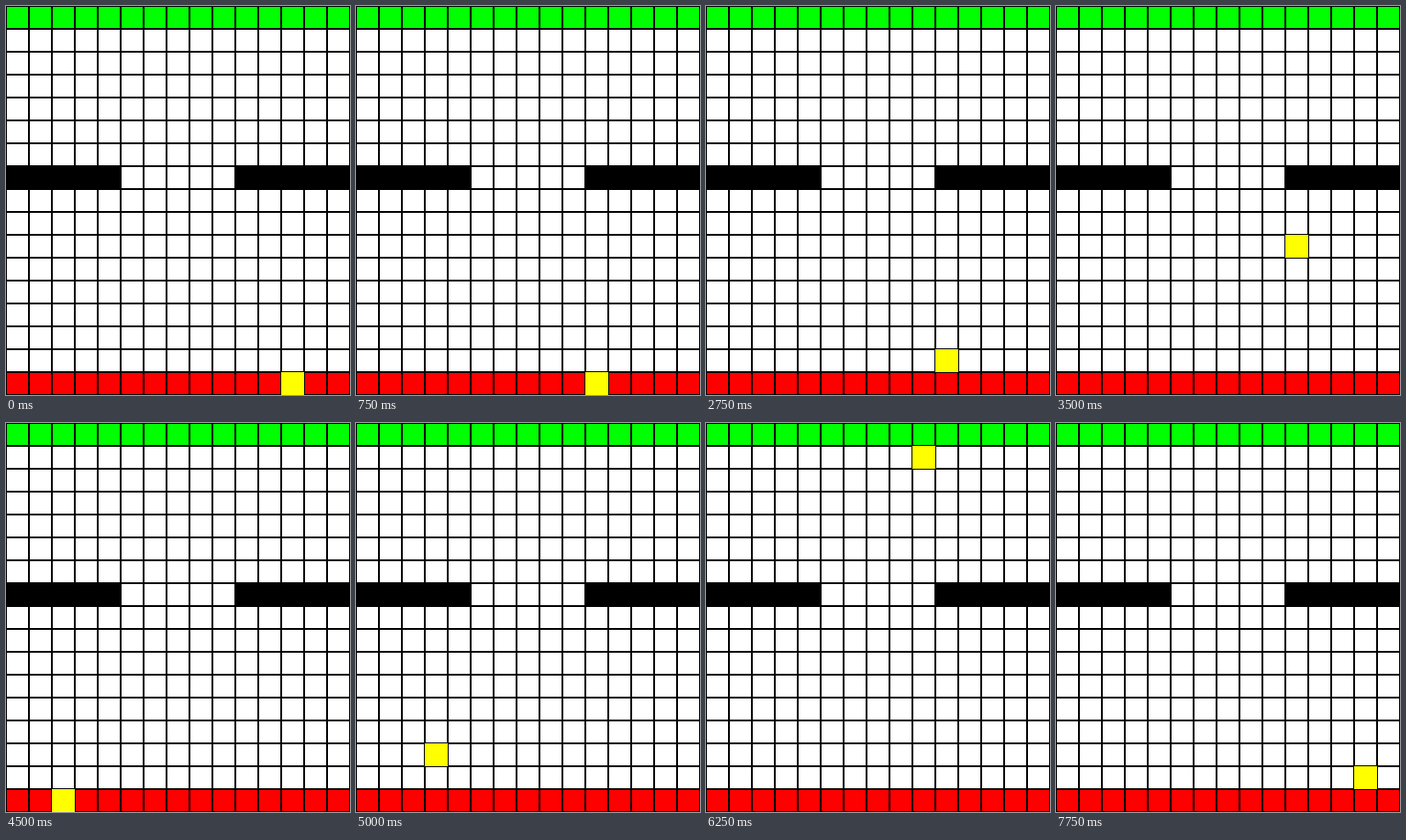
Animation of 375x425 px, one loop 8.25 s. Source, as an HTML page with a canvas:

```html
<!DOCTYPE html>
<html lang="en">
<head>
<meta charset="utf-8">
<title>Grid race</title>
<style>
  html, body { margin: 0; width: 100%; height: 100%; overflow: hidden; background: #fff; }
  canvas { display: block; width: 375px; height: 425px; }
</style>
</head>
<body>
<canvas id="stage" width="375" height="425"></canvas>
<script>
const CELL = 25, COLS = 15, ROWS = 17;
const LAST_ROW = ROWS - 1, WALL_ROW = 7, WALL_LENGTH = 5;
const STEP = 250, LOOP = 33 * STEP;
const HOME = 12;
const ctx = document.getElementById('stage').getContext('2d');

// Steering per step: compass letters accelerate, "." coasts, "x" flashes the home cell.
const runs = [
  { start: HOME, steering: '. . NE' },
  { start: 10, steering: '. . N N N SE' },
  { start: 10, steering: '. . N x N N SE' },
  { start: 1, steering: '. . E NW E N NE x NW E .' },
  { start: HOME, steering: '. . . . NE' }
];

// Change in speed along one axis
function push(word, plus, minus) {
  return word.includes(plus) - word.includes(minus);
}

function drive({ start, steering }) {
  let col = start, row = LAST_ROW, dx = 0, dy = 0;
  return steering.split(' ').map(word => {
    if (word === 'x') return [HOME, LAST_ROW];
    dx += push(word, 'E', 'W');
    dy += push(word, 'S', 'N');
    col += dx;
    row += dy;
    return [col, row];
  });
}

const path = runs.flatMap(drive);

function cellColor(col, row) {
  if (row === 0) return '#00ff00';
  if (row === LAST_ROW) return '#ff0000';
  const fromSide = Math.min(col, COLS - 1 - col);
  return row === WALL_ROW && fromSide < WALL_LENGTH ? '#000' : '#fff';
}

function fillCell(col, row, color, inset) {
  const size = CELL - 2 * inset;
  ctx.fillStyle = color;
  ctx.fillRect(col * CELL + inset, row * CELL + inset, size, size);
}

function drawTrack() {
  ctx.fillStyle = '#000';
  ctx.fillRect(0, 0, COLS * CELL, ROWS * CELL);
  for (let row = 0; row < ROWS; row++) {
    for (let col = 0; col < COLS; col++) fillCell(col, row, cellColor(col, row), 1);
  }
}

function draw(time) {
  drawTrack();
  // The car rests on its last cell until the loop ends
  const step = Math.min(Math.floor(time / STEP), path.length - 1);
  const [col, row] = path[step];
  fillCell(col, row, '#ffff00', 0);
}

const startTime = performance.now();
function tick() {
  draw((performance.now() - startTime) % LOOP);
  requestAnimationFrame(tick);
}
tick();
</script>
</body>
</html>
```
